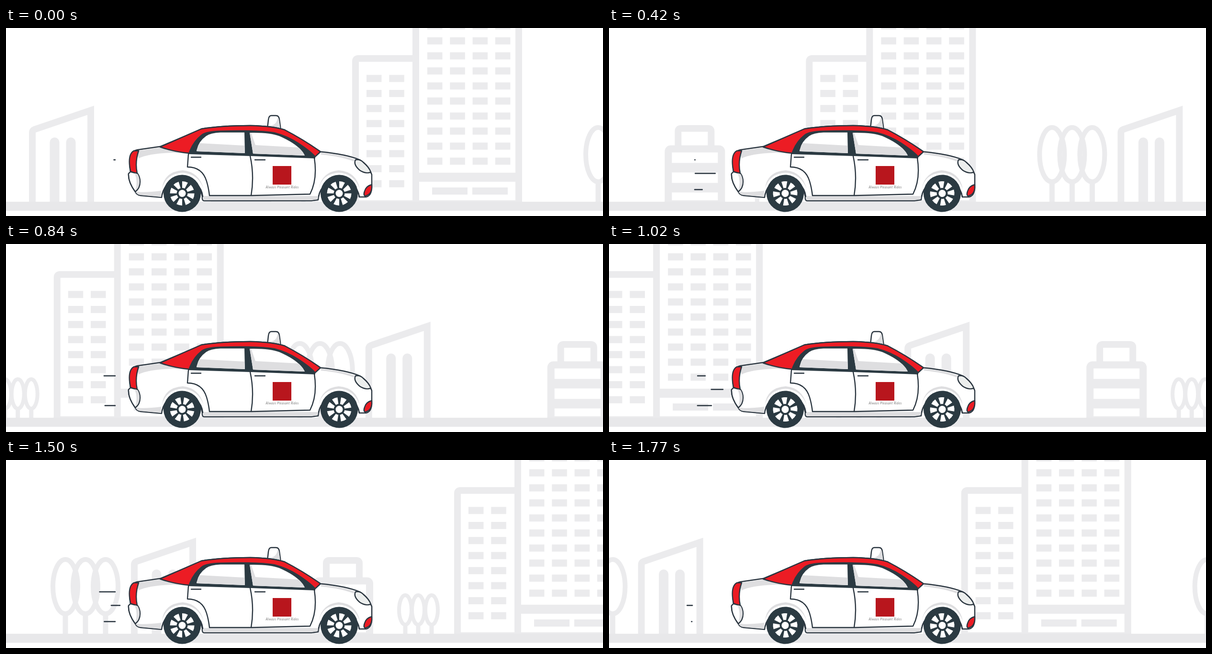
An HTML page for the animation above (1.8 s loop, 1247 by 395 pixels).

```html
<!DOCTYPE html>
<html lang="en">
<head>
<meta charset="utf-8">
<title>Taxi ride</title>
<style>
  html, body { margin: 0; width: 100%; height: 100%; overflow: hidden; background: #fff; }
  svg { display: block; width: 100%; height: 100%; }
  .ink { stroke: #2b3640; stroke-width: 2.4; stroke-linecap: round; stroke-linejoin: round; }
  .line { fill: none; }
  .body { fill: #fff; }
  .shade { fill: #dedee0; }
  .dark { fill: #2b3a42; }
  .red { fill: #ec1c24; }
  .slogan { font: italic 6.6px Lato, sans-serif; fill: #777; letter-spacing: .4px; }
</style>
</head>
<body>
<svg viewBox="0 0 1247 395">
  <defs>
    <g id="city" fill="none" stroke="#ebebed" stroke-width="14">
      <!-- slanted house -->
      <path d="M55 366V220Q55 215 60 213L177 173V366"/>
      <path d="M101.500 366V240M135.500 366V240" stroke-width="20" stroke-linecap="round"/>
      <!-- stepped house -->
      <path d="M456 250V217Q456 211 462 211H519Q525 211 525 217V250"/>
      <path d="M435.500 366V260Q435.500 254 441 254H541Q546.500 254 546.500 260V366" stroke-width="15"/>
      <path d="M436 293.500H546M436 335.500H546" stroke-width="20"/>
      <!-- towers -->
      <path d="M730 366V70Q730 64 736 64H856M856 -10V366M1071 -10V366"/>
      <path d="M856 313.500H1071" stroke-width="19"/>
      <path d="M428 364H554M723 364H1078" stroke-width="4"/>
      <path d="M890 342.500H964M974 342.500H1048" stroke-width="15"/>
      <g id="windows" fill="#ebebed" stroke="none"></g>
      <g id="trees"></g>
    </g>
    <g id="wheel">
      <circle class="dark" r="39"/>
      <circle r="18.500" fill="none" stroke="#fff" stroke-width="14" pathLength="8" stroke-dasharray=".62 .38"/>
      <circle r="7.500" fill="#fff"/>
    </g>
  </defs>

  <g id="scenery">
    <use href="#city"/>
    <use href="#city" x="1326"/>
  </g>
  <path d="M0 365H1247V384H0Z" fill="#e8e8ea"/>
  <g id="streaks" class="ink"></g>

  <g id="car">
    <path class="ink body" d="M546 211L548 193Q549 184 554 184H564Q570 184 571 192L574 214Z"/>
    <path class="shade" d="M554 205Q566 202 567 189L570 191L573 212L548 209Z"/>

    <path class="ink body" d="M325 356L281 352Q273 351 270 344Q255 323 256 306L260 302
      Q253 261 274 256L322 249Q365 231 408 212Q450 205 510 205Q558 206 582 214Q622 235 657 260
      Q710 265 739 277Q757 288 764 308V336Q763 353 752 355H738
      A43 43 0 0 0 653 354L652 361L638 363H414Q409 363 410 354A43 43 0 0 0 326 350Z"/>

    <path class="shade" d="M277 274Q296 264 345 262Q362 262 380 264L322 251L278 257Q272 263 277 274Z"/>
    <path class="shade" d="M658 262Q705 266 732 278L725 280Q700 270 658 266Z"/>
    <path class="shade" d="M326 337Q330 302 369 299Q403 302 413 338Q400 306 369 304Q335 306 326 337Z"/>
    <path class="shade" d="M653 338Q660 302 695 299Q732 302 739 338Q726 305 695 304Q661 306 653 338Z"/>
    <path class="shade" d="M411 353H652L651 360L637 362H415Q410 362 411 353Z"/>
    <path class="shade" d="M270 343Q283 347 324 342V355L281 351Q273 350 270 343Z"/>
    <path class="ink line" d="M326 350A43 43 0 0 1 411 354M653 354A43 43 0 0 1 738 355"/>

    <path class="ink red" d="M322 250Q365 231 408 212Q450 205 510 205Q558 206 582 214Q622 235 657 260
      L645 271L382 263Q350 260 322 250Z" stroke-width="1.500"/>
    <path class="dark" d="M381 264Q389 239 408 224Q418 216 448 215.500Q525 213 561 219Q588 226 611 241
      Q638 259 646 269V274L512 269L382 265Z"/>
    <path class="body" d="M398 259Q401 239 418 227Q428 220 448 219.500H498L499 263Z"/>
    <path class="body" d="M509 220Q550 219 571 227Q614 246 624 268L516 264Z"/>
    <path class="shade" d="M405 242L498 247L499 263L398 259Q400 249 405 242Z"/>
    <path class="shade" d="M509 220H512L521 246L611 251Q621 260 624 268L516 264Z"/>

    <path class="ink line" d="M381 265L379 292Q410 292 419 322Q423 335 425 352H514L635 349
      Q651 318 644 273M510 269Q519 310 512 352M387 271.500H407M520 277H541"/>

    <path class="ink red" d="M277 258Q269 282 274 305Q264 304 260 301Q253 266 267 258Z"/>
    <path class="ink body" d="M260 302L275 306Q280 313 280 323Q280 337 270 344Q255 324 256 306Z"/>
    <path class="shade" d="M269 305L275 307Q279 314 279 323Q278 336 270 342Q276 325 269 305Z"/>
    <path class="ink" fill="#eceeed" d="M730 277Q739 275 746 282Q759 293 762 303Q751 307 739 299Q725 287 730 277Z"/>
    <path class="ink red" d="M764 329Q752 332 749 343Q746 351 750 353Q762 351 764 337Z"/>

    <path d="M557 290H596V329H557Z" fill="#b8161d"/>
    <text class="slogan" x="577" y="337" text-anchor="middle">Always Pleasant Rides</text>

    <use class="wheel" href="#wheel" data-x="368"/>
    <use class="wheel" href="#wheel" data-x="696"/>
  </g>
</svg>

<script>
const LOOP = 1800, STEP = 30;
const SCROLL = 0.742;   // px per ms
const SPIN = 0.6;       // degrees per ms

const byId = id => document.getElementById(id);

function add(parent, tag, attributes) {
  const node = document.createElementNS("http://www.w3.org/2000/svg", tag);
  for (const key in attributes) node.setAttribute(key, attributes[key]);
  return parent.appendChild(node);
}

function windowGrid(x, y, columns, rows) {
  for (let c = 0; c < columns; c++)
    for (let r = 0; r < rows; r++)
      add(byId("windows"), "rect", { x: x + c * 47.3, y: y + r * 31.6, width: 31.5, height: 15 });
}
windowGrid(880, -12.1, 4, 10);
windowGrid(753, 98.5, 2, 8);

function tree(cx, cy, rx, ry, width) {
  add(byId("trees"), "ellipse", { cx, cy, rx, ry, "stroke-width": width });
  add(byId("trees"), "path", { d: `M${cx} ${cy + ry}V366`, "stroke-width": width + 1 });
}
for (const x of [621, 648, 676]) tree(x, 315, 13, 31, 8);
for (const x of [1237, 1279, 1321]) tree(x, 266, 26, 57, 10);

// Each streak grows from x = from, then its tail catches up at x = to.
const streaks = [
  { y: 277, from: 228, to: 179, lead: 0.11, tail: 0.4, ends: [422, 1075, 1650] },
  { y: 305.500, from: 238, to: 157, lead: 0.21, tail: 0.59, ends: [530, 1290, 1799] },
  { y: 339.500, from: 228, to: 172, lead: 0.122, tail: 0.4, ends: [477, 1125, 1773] }
];
for (const s of streaks) s.node = add(byId("streaks"), "path", {});

function drawStreak({ node, y, from, to, lead, tail, ends }, t) {
  const left = ends.find(end => end > t) - t;
  const front = to + lead * left;
  const back = Math.min(from, to + tail * left);
  node.setAttribute("d", front < back ? `M${front} ${y}H${back}` : "");
}

const wheels = document.querySelectorAll(".wheel");

function draw(now) {
  const t = Math.floor(now % LOOP / STEP) * STEP;
  byId("scenery").setAttribute("transform", `translate(${-SCROLL * t})`);
  for (const wheel of wheels)
    wheel.setAttribute("transform", `translate(${wheel.dataset.x} 347.500) rotate(${SPIN * t})`);
  for (const s of streaks) drawStreak(s, t);
}

const start = performance.now();
function tick() {
  draw(performance.now() - start);
  requestAnimationFrame(tick);
}
tick();
</script>
</body>
</html>
```
